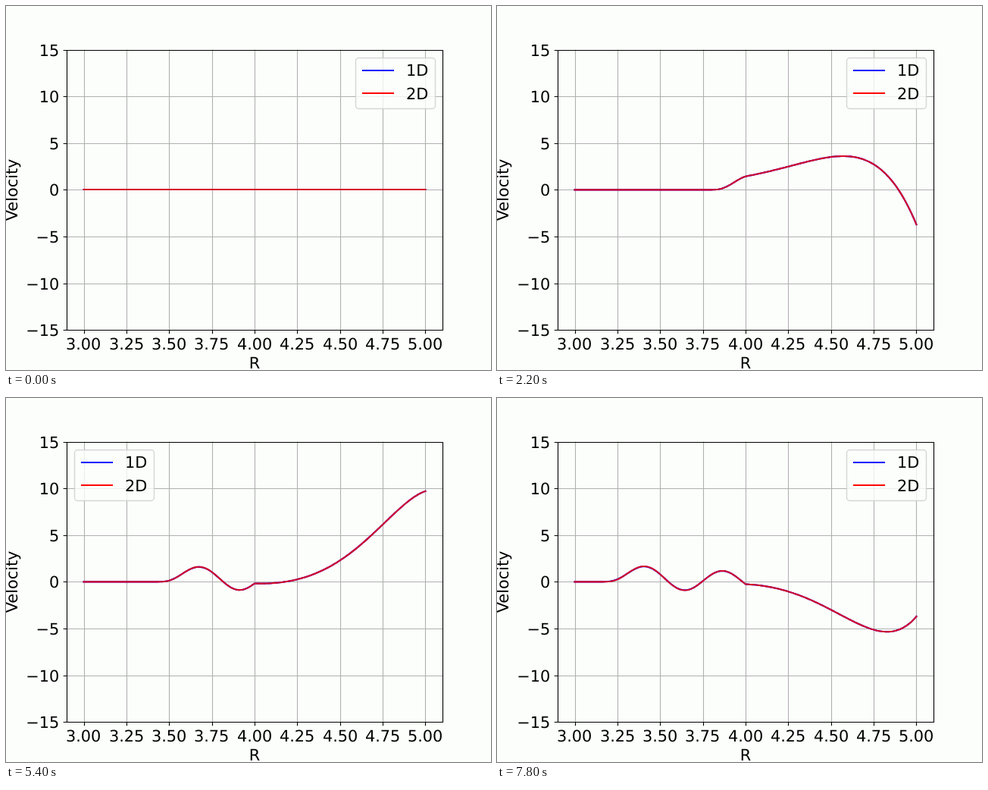
Animation, 640 px wide and 480 px high, one loop 8 s. Source, as an HTML page:

```html
<!DOCTYPE html>
<html lang="en">
<head>
<meta charset="utf-8">
<title>Velocity over R</title>
<style>
  html, body { margin: 0; width: 100%; height: 100%; overflow: hidden; background: #fcfefc; }
  svg { display: block; width: 640px; height: 480px; }
  text { font: 20.83px "DejaVu Sans", sans-serif; text-rendering: geometricPrecision; }
  .grid { stroke: #b0b0b0; stroke-width: 1.11; }
  .axis { stroke: #000; stroke-width: 1.11; fill: none; }
  .curve { fill: none; stroke-width: 2.08; stroke-linecap: square; stroke-linejoin: round; }
</style>
</head>
<body>
<svg id="plot" viewBox="0 0 640 480"></svg>
<script>
const STEP = 200, FRAMES = 40, PERIOD = 20;
const BLUE = '#0000ff', RED = '#ff0000', CRIMSON = '#d60829';
const svg = document.getElementById('plot');

function add(tag, attrs, parent = svg, text = '') {
  const el = document.createElementNS('http://www.w3.org/2000/svg', tag);
  for (const name in attrs) el.setAttribute(name, attrs[name]);
  el.textContent = text;
  parent.appendChild(el);
  return el;
}
const line = (d, cls) => add('path', { d, class: cls });
const label = (x, y, text, anchor, parent) =>
  add('text', { x, y, 'text-anchor': anchor }, parent, text);

const px = r => 102.545 + 225.455 * (r - 3);
const py = v => 242.4 - 12.32 * v;
const snap = p => Math.floor(p + 0.5) + 0.5;

// Elastic ring (3 < r < 4) coupled to a viscous fluid (4 < r < 5)
// whose outer wall swings with one period per time unit.
function simulate(damping) {
  const n = 200, mid = n / 2, dr = 2 / n, sub = 1000;
  const dt = 1 / (PERIOD * sub);
  const eta = 0.4, shear = 0.4, dense = 2;
  const r = Array.from({ length: n + 1 }, (_, i) => 3 + i * dr);
  const v = new Float64Array(n + 1);      // velocity
  const u = new Float64Array(n + 1);      // displacement
  const torque = new Float64Array(n);
  const frames = [];

  for (let k = 0; k < FRAMES; k++) {
    const lift = k ? 0 : 0.4;             // a flat line sits on whole pixels
    frames.push('M' + r.map((ri, i) =>
      px(ri).toFixed(2) + ' ' + (py(v[i]) - lift).toFixed(2)).join('L'));
    for (let s = 1; s <= sub; s++) {
      for (let i = 0; i < n; i++) {
        const m = r[i] + dr / 2;
        const rate = v[i + 1] / r[i + 1] - v[i] / r[i];
        const stress = i >= mid ? eta * rate
          : shear * (u[i + 1] / r[i + 1] - u[i] / r[i]) + damping * rate;
        torque[i] = m * m * m * stress / dr;
      }
      for (let i = 1; i < n; i++) {
        const rho = i < mid ? dense : i > mid ? 1 : (dense + 1) / 2;
        v[i] += dt * (torque[i] - torque[i - 1]) / (dr * rho * r[i] * r[i]);
        if (i <= mid) u[i] += dt * v[i];
      }
      v[n] = 12 * Math.sin(2 * Math.PI * (k + s / sub) / PERIOD);
    }
  }
  return frames;
}

// Grid, ticks and labels
let ticks = '';
for (let i = 0; i <= 8; i++) {
  const r = 3 + i / 4, x = snap(px(r));
  line(`M${x} 57.6V427.2`, 'grid');
  ticks += `M${x} 427.5v4.86`;
  label(Math.round(px(r) - 23.2), 453, r.toFixed(2), 'start');
}
for (let v = -15; v <= 15; v += 5) {
  const y = snap(py(v));
  line(`M80 ${y}H576`, 'grid');
  ticks += `M80.5 ${y}h-4.86`;
  label(70.3, Math.round(py(v) + 8), String(v).replace('-', '\u2212'), 'end');
}
label(328, 478, 'R', 'middle');
add('text', { transform: 'translate(15 242.4) rotate(-90)', 'text-anchor': 'middle' }, svg, 'Velocity');

const series = [[BLUE, simulate(0.0004)], [CRIMSON, simulate(0)]].map(([stroke, frames]) =>
  ({ frames, path: add('path', { class: 'curve', stroke }) }));

line(ticks, 'axis');
line('M80.5 58.5H576.5V427.5H80.5Z', 'axis');

// Legend
const legend = add('g', {});
add('rect', { x: 461.5, y: 68.5, width: 105, height: 67, rx: 4, fill: '#fcfefc', 'fill-opacity': 0.8,
  stroke: '#ccc', 'stroke-opacity': 0.8, 'stroke-width': 1.39 }, legend);
[['1D', BLUE, 85, 92], ['2D', RED, 115, 123]].forEach(([name, stroke, y, base]) => {
  add('path', { d: `M471 ${y}h40`, class: 'curve', stroke }, legend);
  label(528, base, name, 'start', legend);
});

function draw(ms) {
  const k = Math.floor(ms / STEP) % FRAMES;
  for (const s of series) s.path.setAttribute('d', s.frames[k]);
  // The legend moves left while the curve would run under it.
  const high = 12 * Math.sin(2 * Math.PI * k / PERIOD) > 8.7;
  legend.setAttribute('transform', `translate(${high ? -371 : 0} 0)`);
}

let start;
function tick(now) {
  start ??= now;
  draw(Math.max(0, now - start));
  requestAnimationFrame(tick);
}
draw(0);
requestAnimationFrame(tick);
</script>
</body>
</html>
```
